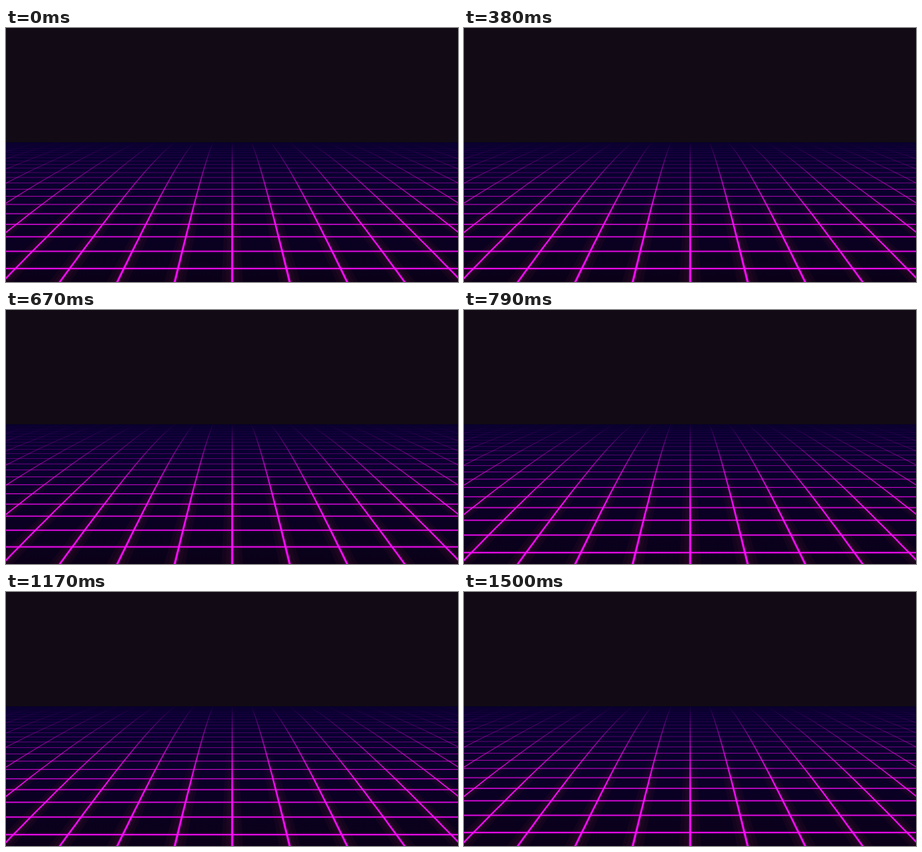
An HTML page with a canvas for the animation above (1540 ms loop, 640x360 px).

```html
<!DOCTYPE html>
<html lang="en">
<head>
<meta charset="utf-8">
<title>Neon grid</title>
<style>
  html, body { margin: 0; width: 100%; height: 100%; overflow: hidden; background: #120a14; }
  canvas { display: block; width: 640px; height: 360px; }
</style>
</head>
<body>
<canvas id="stage" width="640" height="360"></canvas>
<script>
const ctx = document.getElementById('stage').getContext('2d');
const W = 640, H = 360, CX = 320.3, HORIZON = 162;
const LOOP = 1540, FPS = 24, STEPS = 37;

// "size" is the on-screen width of one cell; the far ground bends down.
const FAR_SIZE = 27, NEAR_SIZE = 84, EDGE_SIZE = 81.5;
const groundY = size => -14 + 4.357 * size + 1582 / size;

// Distance of the nearest full row and of one cell.
const CELL = 0.001106, FIRST = 11.785;

// [step, cells travelled]
const TRAVEL = [[0, 0], [4, 0.385], [13, 1.495], [19, 2.11], [36, 4]];

const strength = size => Math.max(0, Math.min(1, (size - 26) / 34));
const rgba = (rgb, a) => `rgba(${rgb},${a.toFixed(3)})`;
const lineColor = a => rgba('255,12,250', a);
const glowColor = a => rgba('150,0,170', 0.16 * a * a);
const hazeColor = a => rgba('80,20,40', 0.14 * a * a * a);

const sizes = Array.from({ length: 41 }, (_, i) => FAR_SIZE + (NEAR_SIZE - FAR_SIZE) * i / 40);

function depthGradient(color) {
  const bottom = groundY(NEAR_SIZE);
  const g = ctx.createLinearGradient(0, HORIZON, 0, bottom);
  for (const s of sizes) {
    const at = (groundY(s) - HORIZON) / (bottom - HORIZON);
    g.addColorStop(Math.max(0, Math.min(1, at)), color(strength(s)));
  }
  return g;
}

const floorFill = ctx.createLinearGradient(0, HORIZON, 0, H);
floorFill.addColorStop(0, '#08002c');
floorFill.addColorStop(0.06, '#0a0032');
floorFill.addColorStop(0.25, '#0a0030');
floorFill.addColorStop(0.6, '#0a0024');
floorFill.addColorStop(1, '#0a0118');

const coreFill = depthGradient(lineColor);
const glowFill = depthGradient(glowColor);
const hazeFill = depthGradient(hazeColor);

function rail(i, width, fill) {
  const half = width / EDGE_SIZE / 2;
  ctx.beginPath();
  for (const s of sizes) ctx.lineTo(CX + (i - half) * s, groundY(s));
  for (const s of [...sizes].reverse()) ctx.lineTo(CX + (i + half) * s, groundY(s));
  ctx.fillStyle = fill;
  ctx.fill();
}

function rung(size, width, fill) {
  const h = width * (size / EDGE_SIZE) ** 2;
  ctx.fillStyle = fill;
  ctx.fillRect(0, groundY(size) - h / 2, W, h);
}

function travelAt(step) {
  const i = Math.max(1, TRAVEL.findIndex(([s]) => s >= step));
  const [a, from] = TRAVEL[i - 1], [b, to] = TRAVEL[i];
  return from + (to - from) * (step - a) / (b - a);
}

function draw(step) {
  ctx.fillStyle = '#120a14';
  ctx.fillRect(0, 0, W, H);
  ctx.fillStyle = floorFill;
  ctx.fillRect(0, HORIZON, W, H - HORIZON);

  const phase = travelAt(step) % 1;
  const rungs = [];
  for (let n = -1; ; n++) {
    const size = 1 / (CELL * (FIRST + n - phase));
    if (size <= FAR_SIZE) break;
    rungs.push(size);
  }
  const rails = Array.from({ length: 25 }, (_, i) => i - 12);

  for (const i of rails) {
    rail(i, 30, hazeFill);
    rail(i, 18, hazeFill);
    rail(i, 7, glowFill);
  }
  for (const s of rungs) {
    rung(s, 6, glowColor(strength(s)));
    rung(s, 2.1, lineColor(0.95 * strength(s)));
  }
  for (const i of rails) rail(i, 3, coreFill);
}

// Steps start on whole hundredths of a second.
const stepStart = k => Math.round(k * 100 / FPS) * 10;
let shown = -1;
const start = performance.now();

function tick(now) {
  const t = Math.max(0, now - start) % LOOP;
  let step = 0;
  while (step < STEPS - 1 && stepStart(step + 1) <= t) step++;
  if (step !== shown) draw(shown = step);
  requestAnimationFrame(tick);
}
tick(start);
</script>
</body>
</html>
```
